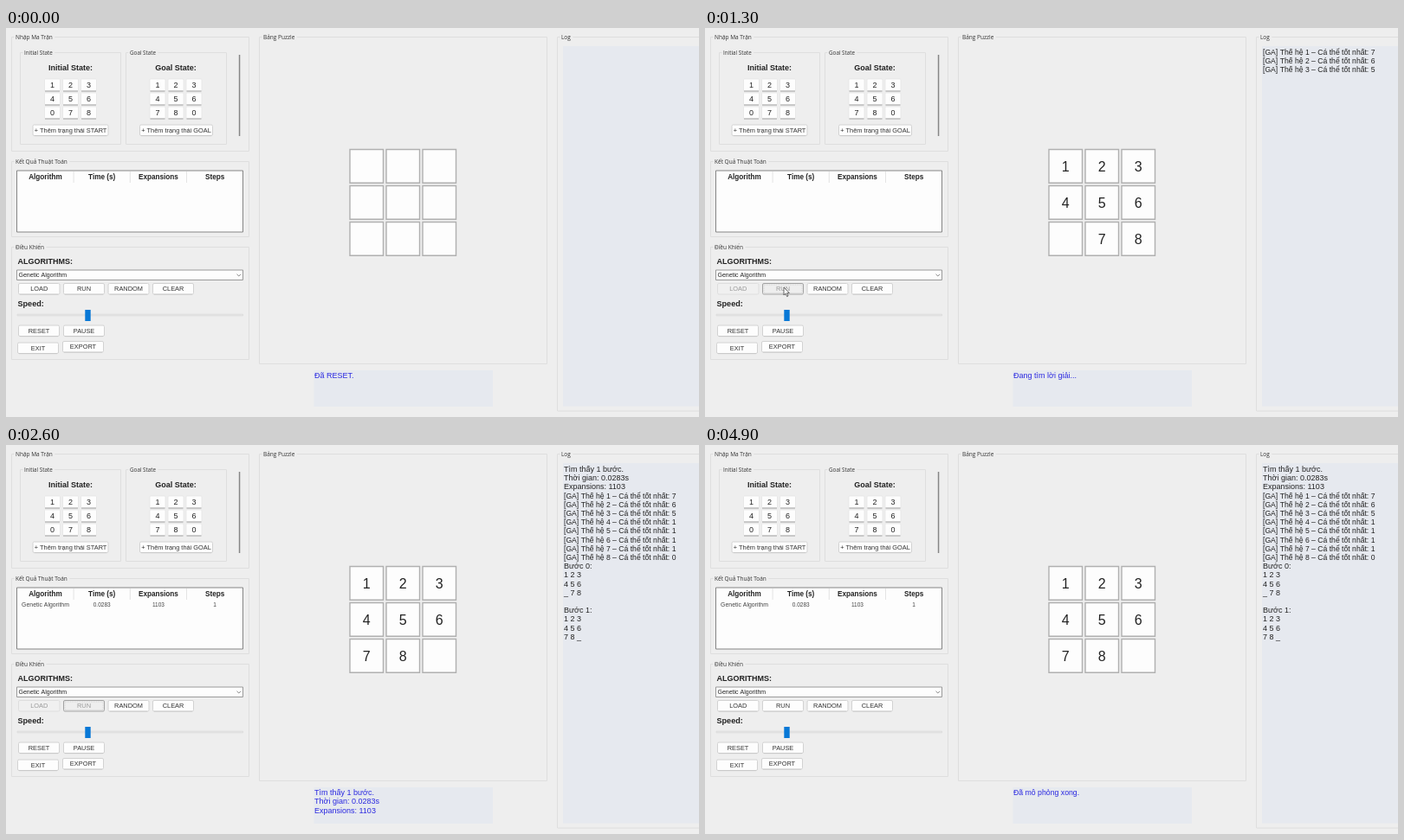
An HTML page with a canvas that plays this animation: 800 by 450 pixels, repeating every 5 s.

```html
<!DOCTYPE html>
<html lang="vi">
<head>
<meta charset="utf-8">
<title>Puzzle</title>
<style>
html, body { margin: 0; width: 100%; height: 100%; overflow: hidden; background: #eee; }
canvas { display: block; width: 800px; height: 450px; }
</style>
</head>
<body>
<canvas id="stage" width="800" height="450"></canvas>
<script>
const ctx = document.getElementById('stage').getContext('2d');
const LOOP = 5000, STEP = 100;
const ARIAL = '"Liberation Sans", Arial, sans-serif';
const UI = '"Open Sans", "Noto Sans", sans-serif';
const PANEL = '#e6e9ef';

// Moments when the program changes state
const T = { hover: 500, load: 700, leave: 900, aim: 1200, run: 1300, found: 1400,
            move: 2400, done: 3400, blur: 4900 };

// Pointer path: time, x, y
const PATH = [[300, 36, 340], [600, 32.5, 303], [900, 32.5, 303], [1200, 91, 300],
              [1800, 91, 300], [2100, 50, 340.5], [2300, 50, 340.5]];

function text(s, x, y, size, o = {}) {
  ctx.font = `${o.bold ? 'bold ' : ''}${size}px ${o.font || ARIAL}`;
  ctx.textAlign = o.align || 'left';
  ctx.fillStyle = o.color || '#222';
  ctx.fillText(s, x, y);
}

function centered(s, x, y, size, o = {}) {
  text(s, x, y, size, { ...o, align: 'center' });
}

function box(x, y, w, h, fill, stroke, radius = 0, line = 1) {
  ctx.beginPath();
  ctx.roundRect(x, y, w, h, radius);
  if (fill) { ctx.fillStyle = fill; ctx.fill(); }
  if (stroke) { ctx.strokeStyle = stroke; ctx.lineWidth = line; ctx.stroke(); }
}

function rule(x1, y1, x2, y2, color, line = 1) {
  ctx.beginPath();
  ctx.moveTo(x1, y1);
  ctx.lineTo(x2, y2);
  ctx.strokeStyle = color;
  ctx.lineWidth = line;
  ctx.stroke();
}

function group(title, x, y, w, h, size = 6.5) {
  box(x, y, w, h, null, '#dedede');
  ctx.font = `${size}px ${UI}`;
  ctx.fillStyle = '#eee';
  ctx.fillRect(x + 3, y - 4, ctx.measureText(title).width + 4, 8);
  text(title, x + 4.5, y + 2.4, size, { font: UI, color: '#333' });
}

const LOOKS = {
  normal: ['#fdfdfd', '#d2d2d2', '#333'],
  hot: ['#e0edf9', '#3f86cf', '#333'],
  focus: ['#fdfdfd', '#6d9fd5', '#333'],
  off: ['#f0f0f0', '#dedede', '#999'],
  offFocus: ['#eeeeee', '#a3a3a3', '#999'],
  onFocus: ['#fafafa', '#bdbdbd', '#333']
};

function button(label, x, y, w = 48, look = 'normal') {
  const [fill, edge, ink] = LOOKS[look];
  box(x + .5, y + .5, w - 1, 12.5, fill, edge, 1.5);
  if (look === 'normal') rule(x + 2, y + 13.2, x + w - 2, y + 13.2, '#c4c4c4', .7);
  if (look === 'hot' || look === 'offFocus') {
    ctx.setLineDash([1, 1]);
    box(x + 2, y + 2, w - 4, 9.5, null, look === 'hot' ? '#7c97b5' : '#c2c2c2', 0, .6);
    ctx.setLineDash([]);
  }
  centered(label, x + w / 2, y + 9.4, 7.4, { color: ink });
}

function matrix(title, x, digits, addLabel, addX, addW) {
  centered(title, x + 21, 48.7, 9, { bold: true });
  [...digits].forEach((d, i) => {
    const cx = x + i % 3 * 21, cy = 66 + Math.floor(i / 3) * 16;
    box(cx - 9, cy - 7, 18, 14, '#fdfdfd', '#e2e2e2', 1, .7);
    rule(cx - 8.5, cy + 7, cx + 8.5, cy + 7, '#999', .9);
    centered(d, cx, cy + 3.3, 9);
  });
  button(addLabel, addX, 111.5, addW);
}

function drawInputs() {
  group('Nhập Ma Trận', 6.5, 10.5, 274, 132);
  group('Initial State', 16.5, 28.5, 116, 106, 6.3);
  group('Goal State', 138.5, 28.5, 116, 106, 6.3);
  matrix('Initial State:', 53.5, '123456078', '+ Thêm trạng thái START', 30.5, 88);
  matrix('Goal State:', 175, '123456780', '+ Thêm trạng thái GOAL', 154, 85);
  box(268.8, 31, 1.5, 94, '#858585');
}

function drawTable(t) {
  group('Kết Quả Thuật Toán', 6.5, 154.5, 274, 87);
  box(12.5, 165, 261, 71, '#fdfdfd', '#858585');
  const heads = ['Algorithm', 'Time (s)', 'Expansions', 'Steps'];
  const row = ['Genetic Algorithm', '0.0283', '1103', '1'];
  heads.forEach((h, i) => {
    const x = 45.5 + i * 65.2;
    centered(h, x, 174.8, 8.2, { bold: true });
    if (i) rule(x - 32.6, 166, x - 32.6, 179, '#dedede', .8);
    if (t >= T.found) centered(row[i], x, 186.6, i ? 6.5 : 6.9, { color: '#444' });
  });
}

function loadLook(t) {
  if (t < T.hover) return 'normal';
  if (t < T.leave) return 'hot';
  if (t < T.run) return 'focus';
  return t < T.done ? 'off' : 'normal';
}

function runLook(t) {
  if (t < T.aim) return 'normal';
  if (t < T.run) return 'hot';
  if (t < T.done) return 'offFocus';
  return t < T.blur ? 'onFocus' : 'normal';
}

function drawControls(t) {
  group('Điều Khiển', 6.5, 253.5, 274, 130);
  text('ALGORITHMS:', 13.5, 273.3, 9, { bold: true });
  box(12.5, 280, 261, 11.5, '#fdfdfd', '#9a9a9a');
  text('Genetic Algorithm', 14.5, 288.4, 7);
  rule(266.5, 284.8, 268.8, 287, '#666', .8);
  rule(268.8, 287, 271, 284.8, '#666', .8);
  button('LOAD', 14, 295, 48.5, loadLook(t));
  button('RUN', 66, 295, 48, runLook(t));
  button('RANDOM', 117.5, 295);
  button('CLEAR', 169, 295);
  text('Speed:', 13.5, 321.6, 9.1, { bold: true });
  box(13, 331, 260.5, 2, '#e4e4e4', '#d4d4d4', 0, .5);
  box(91.3, 326, 6.4, 13, '#0878d6');
  button('RESET', 14, 343.5);
  button('PAUSE', 66, 343.5);
  button('EXIT', 13, 363.5);
  button('EXPORT', 65, 362);
}

function drawBoard(t) {
  group('Bảng Puzzle', 292.5, 10.5, 332, 378);
  const tiles = t < T.load ? '         ' : t < T.move ? '123456 78' : '12345678 ';
  [...tiles].forEach((d, i) => {
    const x = 397 + i % 3 * 42, y = 140.5 + Math.floor(i / 3) * 42;
    box(x, y, 38.5, 38.8, '#fdfdfd', '#b0b0b0', 0, 1.4);
    centered(d, x + 19.2, y + 25.3, 16);
  });
}

const FOUND = ['Tìm thấy 1 bước.', 'Thời gian: 0.0283s', 'Expansions: 1103'];

function drawStatus(t) {
  box(355.5, 396, 206.5, 42, PANEL);
  let lines = FOUND, size = 9;
  if (t < T.load) lines = ['Đã RESET.'];
  else if (t < T.run) { lines = ['Đã LOAD ma trận START và GOAL.']; size = 8.72; }
  else if (t < T.found) lines = ['Đang tìm lời giải...'];
  else if (t >= T.done) { lines = ['Đã mô phỏng xong.']; size = 8.72; }
  lines.forEach((s, i) => text(s, 356, 405.1 + i * 10.2, size, { color: '#2a28e0' }));
}

function logLines(t) {
  if (t < T.run) return [];
  const ga = [7, 6, 5, 1, 1, 1, 1, 0].map((f, i) => `[GA] Thế hệ ${i + 1} – Cá thể tốt nhất: ${f}`);
  if (t < T.found) return ga.slice(0, 3);
  const lines = [...FOUND, ...ga, 'Bước 0:', '1 2 3', '4 5 6', '_ 7 8'];
  if (t >= T.move) lines.push('', 'Bước 1:', '1 2 3', '4 5 6', '7 8 _');
  return lines;
}

function drawLog(t) {
  group('Log', 636.5, 10.5, 180, 432.5);
  box(643, 21, 160, 416.5, PANEL);
  logLines(t).forEach((s, i) => text(s, 644, 30.9 + i * 10.21, s[0] === '[' ? 8.65 : 9));
}

function drawPointer(t) {
  if (t < PATH[0][0] || t >= PATH[PATH.length - 1][0]) return;
  const i = PATH.findIndex(p => p[0] > t);
  const [t0, x0, y0] = PATH[i - 1], [t1, x1, y1] = PATH[i];
  let k = (t - t0) / (t1 - t0);
  k = k * k * (3 - 2 * k);
  ctx.save();
  ctx.translate(x0 + (x1 - x0) * k, y0 + (y1 - y0) * k);
  ctx.beginPath();
  [[0, 0], [0, 9], [2, 7.2], [3.6, 10.6], [5, 10], [3.5, 6.7], [6.3, 6.5]]
    .forEach(p => ctx.lineTo(...p));
  ctx.closePath();
  ctx.fillStyle = '#fff';
  ctx.fill();
  ctx.strokeStyle = '#444';
  ctx.lineWidth = .8;
  ctx.stroke();
  ctx.restore();
}

function draw(now) {
  const t = Math.floor(now % LOOP / STEP) * STEP;
  ctx.fillStyle = '#eee';
  ctx.fillRect(0, 0, 800, 450);
  drawInputs();
  drawTable(t);
  drawControls(t);
  drawBoard(t);
  drawStatus(t);
  drawLog(t);
  drawPointer(t);
}

const start = performance.now();
function tick() {
  draw(performance.now() - start);
  requestAnimationFrame(tick);
}
tick();
</script>
</body>
</html>
```
